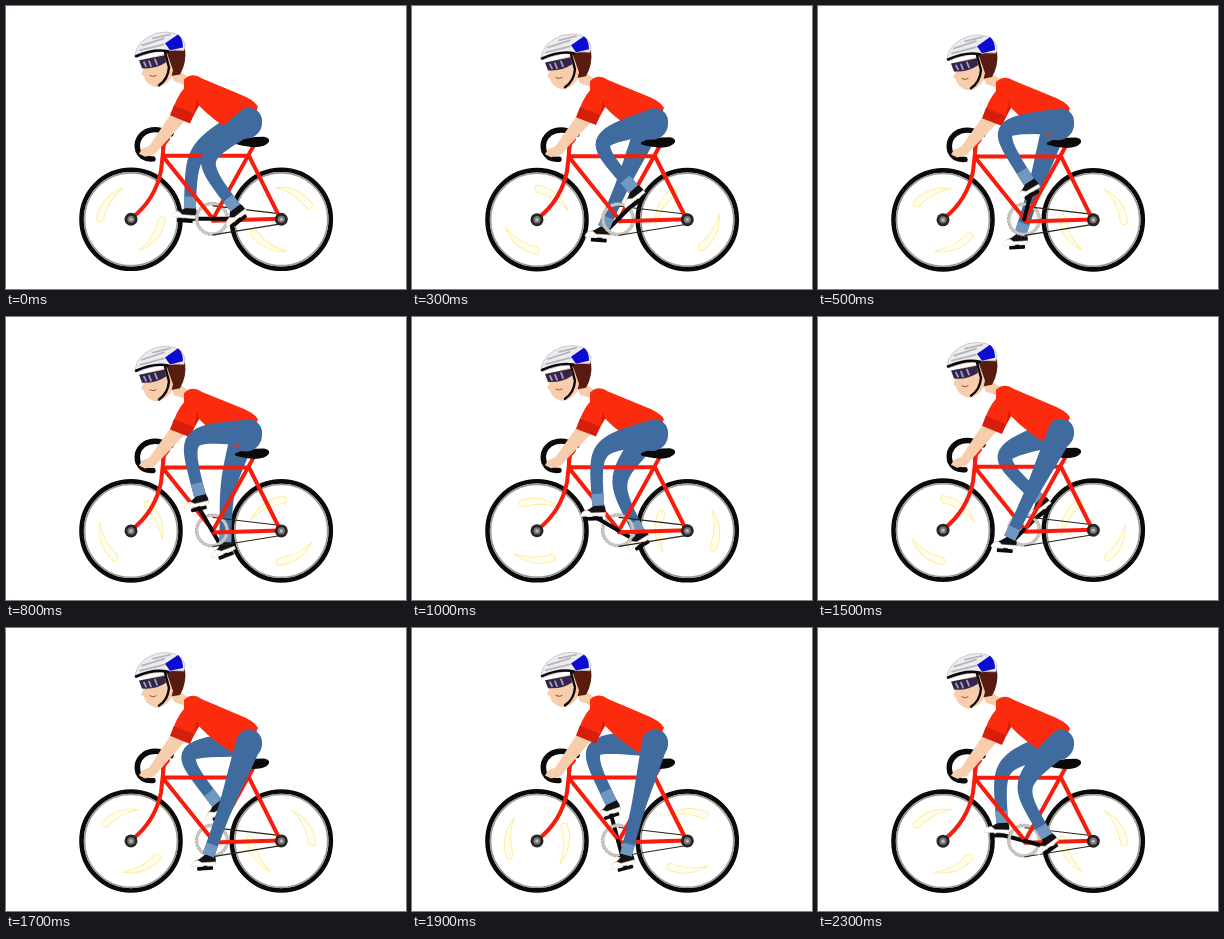
An HTML page for the animation above (2400 ms loop, 400 by 283 pixels).

```html
<!DOCTYPE html>
<html lang="en">
<head>
<meta charset="utf-8">
<title>Cyclist</title>
<style>
  html, body { margin: 0; width: 100%; height: 100%; overflow: hidden; background: #fff; }
  svg { display: block; width: 100vw; height: 100vh; }
  .line { fill: none; stroke-linecap: round; stroke-linejoin: round; }
  .tube { stroke: #f71c0b; stroke-width: 4; }
  .black { stroke: #0b0909; }
  .skin { fill: #f8cdab; }
  .jeans { fill: #406b9e; }
  .cuff { fill: #7097c0; }
</style>
</head>
<body>
<svg viewBox="0 0 400 283">
  <defs>
    <path id="glint" d="M29 -19Q38 2 24 22Q30 3 23 -15Q24 -21 29 -19Z"
      fill="#fffdf0" stroke="#ffee9c" stroke-width="1"/>
    <g id="glints"><use href="#glint"/><use href="#glint" transform="rotate(180)"/></g>
    <g id="rim" fill="none">
      <circle r="49.5" stroke="#0b0909" stroke-width="4.6"/>
      <circle r="46.4" stroke="#9a9a96" stroke-width="1.6"/>
    </g>
    <g id="hub">
      <circle r="6.5" fill="#292524"/>
      <circle r="3.6" fill="#777"/>
      <circle r="1.6" fill="#bbb"/>
    </g>
    <g id="shoe">
      <rect x="-8" y="0" width="16" height="3.6" rx="1" fill="#0b0909"/>
      <path d="M-13 -2Q-13 -6 -5 -8L1 -12H10Q12 -7 11 -2Z" fill="#141214"/>
      <path d="M-14 -1Q-14 -6 -7 -7L-3 -4L11 -4V-1Z" fill="#fff" stroke="#e9dfc4" stroke-width=".6"/>
    </g>
  </defs>

  <g id="rider">
    <g transform="translate(125 213.4)"><use href="#rim"/>
      <g class="spin" data-phase="147"><use href="#glints"/></g>
    </g>
    <g transform="translate(275.3 213.4)"><use href="#rim"/>
      <g class="spin" data-phase="58"><use href="#glints" transform="scale(1 -1)"/></g>
    </g>

    <g id="far"></g>

    <g class="line">
      <circle cx="206" cy="213" r="15" stroke="#c9c6c0" stroke-width="3"/>
      <circle cx="206" cy="213" r="16.6" stroke="#aaa69f" stroke-width="1" stroke-dasharray="1.5 2"/>
      <path d="M207 200L275 208M207 229L275 218" stroke="#2b2318" stroke-width="1.2"/>
      <path class="tube" d="M157 150H243M158 152L207 213M247 141L207 213M243 150L274 212M207 215L274 213"/>
    </g>
    <use href="#hub" x="275.3" y="213.4"/>
    <path class="line tube" d="M158 137L155 165Q149 194 126 212"/>
    <use href="#hub" x="125" y="213.4"/>
    <path class="line black" d="M165 128Q148 120 138 127Q129 134 132 145Q136 154 147 153" stroke-width="5.4"/>
    <path class="line tube" d="M162 133L157 139V151"/>
    <path d="M229 136Q239 131 258 131Q264 132 263 136Q260 141 248 141.500Q235 140 229 138Z" fill="#0b0909"/>

    <path id="arm" class="skin"/>
    <path class="skin" d="M146 139L152 143L148 149L139 151L133 148L136 143Z"/>

    <g id="body">
      <path class="skin" d="M164 66L172 64L183 72L180 80L168 76Z"/>
      <circle class="jeans" cx="240" cy="117" r="16"/>
      <path d="M178 74Q186 66 196 73L232 88Q248 94 252 101Q247 118 231 129Q207 115 193 100L184 117L165 109Q170 92 178 83Z" fill="#fb2b0e"/>
      <path d="M168 100L188 108L184 118L164 110Z" fill="#d51f0c"/>
      <path d="M193 100L188 108L191 93Z" fill="#d51f0c"/>
      <path d="M160 46L179 43Q181 57 174 69L163 71Z" fill="#571b10"/>
      <path class="skin" d="M138 54L137 65L135 69L138 71Q139 79 150 82Q158 82 165 73L167 65L161 48Z"/>
      <path class="line" d="M144 70Q147 72 150 70" stroke="#8a5140" stroke-width="1"/>
      <path d="M133 55L159 50L160 57Q150 64 136 63Z" fill="#33264a"/>
      <path class="line" d="M138 57L140 61M143 56L145 61M149 54L151 59" stroke="#a79ec4" stroke-width="1.8"/>
      <path class="line black" d="M159 47L163 62Q162 74 153 80" stroke-width="2.4"/>
      <path d="M129 50Q131 35 150 28Q173 23 179 38L178 45Q156 43 131 52Z" fill="#ececf0" stroke="#c2c1bc" stroke-width=".8"/>
      <path class="line" d="M136 40L158 33M134 45L158 39M147 33L164 29" stroke="#b4b4ba" stroke-width="1.8"/>
      <path d="M159 38L172 29Q177 33 177 42L164 45Z" fill="#0c0cd0"/>
      <path class="line black" d="M130 51Q148 43 162 46" stroke-width="2.6"/>
    </g>

    <g id="near"></g>
  </g>
</svg>

<script>
const LOOP = 2400, STEP = 100;
const AXLE = [206, 213];
const CRANK = 27, THIGH = 56, SHIN = 55;
const rad = deg => deg * Math.PI / 180;
const $ = id => document.getElementById(id);

// The knee bends forward, to the left.
function kneeOf(hip, ankle) {
  const dx = ankle[0] - hip[0], dy = ankle[1] - hip[1], d = Math.hypot(dx, dy);
  const along = (THIGH ** 2 - SHIN ** 2 + d * d) / (2 * d);
  const out = Math.sqrt(Math.max(0, THIGH ** 2 - along ** 2));
  return [hip[0] + (dx * along - dy * out) / d, hip[1] + (dy * along + dx * out) / d];
}

// Tapered outline of a curve through hip, knee and ankle, between t0 and 1.
function legShape(hip, knee, ankle, t0) {
  const bend = knee.map((k, i) => (8 * k - hip[i] - ankle[i]) / 6);
  const left = [], right = [], count = 24;
  for (let i = 0; i <= count; i++) {
    const t = t0 + (1 - t0) * i / count, u = 1 - t;
    const [x, y] = bend.map((b, j) => u ** 3 * hip[j] + 3 * t * u * b + t ** 3 * ankle[j]);
    const [dx, dy] = bend.map((b, j) => t * t * (ankle[j] - b) + u * u * (b - hip[j]) );
    const r = (6 + 7 * u * u) / Math.hypot(dx, dy);
    left.push([x - dy * r, y + dx * r]);
    right.unshift([x + dy * r, y - dx * r]);
  }
  const cap = t0 ? "" : `A13 13 0 0 0 ${left[0]}`;
  return `M${left.join("L")}L${right.join("L")}${cap}Z`;
}

function makeLeg(id, hip) {
  $(id).innerHTML = `<path class="line black" stroke-width="4"/><use href="#shoe"/>
    <path class="jeans"/><path class="cuff"/>`;
  const [crank, shoe, leg, cuff] = $(id).children;
  return deg => {
    const px = AXLE[0] + CRANK * Math.cos(rad(deg));
    const py = AXLE[1] - CRANK * Math.sin(rad(deg));
    const tilt = -17 - 23 * Math.cos(rad(deg - 20));
    const c = Math.cos(rad(tilt)), s = Math.sin(rad(tilt));
    const ankle = [px + 4 * c + 11 * s, py + 4 * s - 11 * c];
    const knee = kneeOf(hip, ankle);
    crank.setAttribute("d", `M${AXLE}L${px} ${py}`);
    shoe.setAttribute("transform", `translate(${px} ${py}) rotate(${tilt})`);
    leg.setAttribute("d", legShape(hip, knee, ankle, 0));
    cuff.setAttribute("d", legShape(hip, knee, ankle, .93));
  };
}

const farLeg = makeLeg("far", [238, 116]);
const nearLeg = makeLeg("near", [243, 115]);
const wheels = document.querySelectorAll(".spin");

function draw(now) {
  const n = Math.floor(now % LOOP / STEP);
  const deg = n * 15;
  farLeg(deg + 180);
  nearLeg(deg);
  for (const w of wheels) w.setAttribute("transform", `rotate(${-w.dataset.phase - n * 30})`);
  const bob = Math.cos(rad(deg - 105));
  $("rider").setAttribute("transform", `translate(0 ${.5 * bob})`);
  $("body").setAttribute("transform", `translate(245 ${bob}) skewY(${-.7 * bob}) translate(-245 0)`);
  const dy = 1.9 * bob;
  $("arm").setAttribute("d", `M168 ${104 + dy}L181 ${113 + dy}L149 148L142 142Z`);
}

const start = performance.now();
function tick() {
  draw(performance.now() - start);
  requestAnimationFrame(tick);
}
tick();
</script>
</body>
</html>
```
